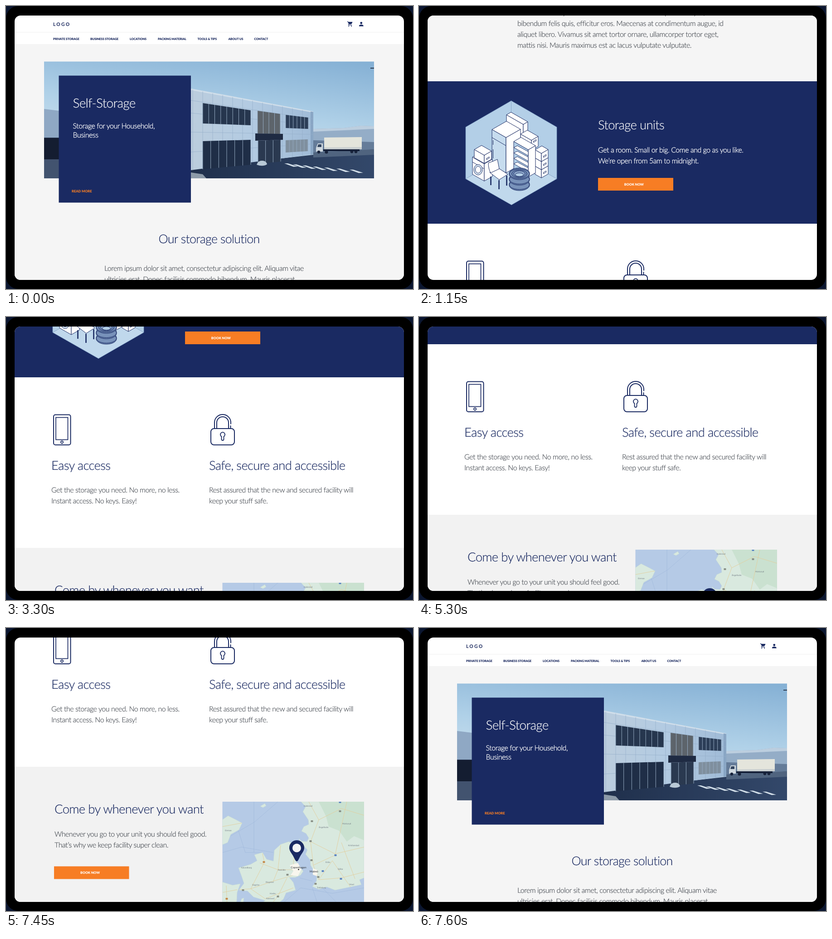
Write an HTML page that moves like this. It is 898 by 624 pixels and loops after 8.6 s.

```html
<!DOCTYPE html>
<html lang="en">
<head>
<meta charset="utf-8">
<title>Storage website walkthrough</title>
<style>
html, body { margin: 0; width: 100%; height: 100%; overflow: hidden; background: #0b1630; }
#tablet { position: absolute; left: 0; top: 0; width: 898px; height: 624px; border-radius: 27px; background: #000; }
#screen { position: absolute; left: 19px; top: 21px; width: 859px; height: 583px; border-radius: 13px; overflow: hidden; background: #fff; }
#page { position: absolute; left: -19px; top: -21px; display: block; }
text { font-family: Lato, "Noto Sans", sans-serif; text-rendering: geometricPrecision; white-space: pre; }
.h, .p { font-weight: 300; fill: currentColor; stroke: currentColor; stroke-width: .2; }
.h { font-size: 27.5px; letter-spacing: -.024em; color: #1a2a62; }
.p { font-size: 15.9px; letter-spacing: -.027em; color: #464b52; }
.light { color: #fff; }
.p.light { stroke-width: .35; }
.nav { font-size: 6.6px; font-weight: 900; letter-spacing: -.01em; fill: #14235a; }
.btn { font-size: 7.3px; font-weight: 900; fill: #fff; text-anchor: middle; }
.foot { font-size: 7.6px; fill: #fff; }
.navy { fill: #1a2a62; }
.orange { fill: #f77d24; }
.line { fill: none; stroke: #1a2a62; stroke-width: 2; stroke-linecap: round; }
.land { fill: #d9e9df; stroke: #c3d8d6; stroke-width: .6; }
.road { fill: none; stroke: #e2cf9d; stroke-width: .9; }
.ferry { fill: none; stroke: #9db5d8; stroke-width: .6; }
.place { font-size: 4.6px; fill: #6e7780; }
.city { font-size: 6.2px; fill: #2c3036; }
</style>
</head>
<body>
<div id="tablet"><div id="screen">
<svg id="page" width="898" height="2000" viewBox="0 0 898 2000">
  <defs>
    <linearGradient id="sky" x1=".9" y1="0" x2=".6" y2="1">
      <stop offset="0" stop-color="#86b1d5"/><stop offset=".5" stop-color="#b0d1e8"/><stop offset="1" stop-color="#d6e6f0"/>
    </linearGradient>
    <linearGradient id="wall"><stop offset="0" stop-color="#bccddd"/><stop offset=".5" stop-color="#b3cbe2"/><stop offset="1" stop-color="#a0bbd7"/></linearGradient>
    <linearGradient id="asphalt" x2="1"><stop offset="0" stop-color="#1f2f4b"/><stop offset="1" stop-color="#33486a"/></linearGradient>
    <clipPath id="photoClip"><path d="M84 122.5H812V380H84z"/></clipPath>
    <clipPath id="mapClip"><path d="M477.5 150H790V383.5H477.5z"/></clipPath>
  </defs>

  <!-- page bands -->
  <path fill="#f5f5f5" d="M0 84H898V778H0z"/>
  <path fill="#f0f0f0" d="M0 57.5H898V58.5H0z"/>
  <path class="navy" d="M0 778H898V1092H0z"/>
  <path fill="#f2f2f2" d="M0 1468H898V1856H0z"/>
  <path class="navy" d="M0 1856H898V2000H0z"/>

  <!-- header -->
  <text x="104" y="44" fill="#14235a" style="font-size:10.4px;font-weight:700;letter-spacing:2.2px">LOGO</text>
  <path class="navy" transform="translate(752.3 32.8) scale(.575)" d="M7 18a2 2 0 1 0 0 4 2 2 0 0 0 0-4zM1 2v2h2l3.6 7.6-1.35 2.44A2 2 0 0 0 7 17h12v-2H7.42a.25.25 0 0 1-.22-.37L8.1 13h7.45c.75 0 1.41-.41 1.75-1.03l3.58-6.49A1 1 0 0 0 20 4H5.2l-.93-2zM17 18a2 2 0 1 0 0 4 2 2 0 0 0 0-4z"/>
  <path class="navy" transform="translate(776.6 32.7) scale(.6)" d="M12 12a4 4 0 1 0 0-8 4 4 0 0 0 0 8zm0 2c-2.67 0-8 1.34-8 4v2h16v-2c0-2.66-5.33-4-8-4z"/>
  <g id="nav" class="nav"></g>

  <!-- hero -->
  <g clip-path="url(#photoClip)">
    <path fill="url(#sky)" d="M84 122H812V381H84z"/>
    <path fill="#8fa8c4" d="M84 227l33 4v64H84z"/>
    <path fill="#42536f" d="M84 290h40v92H84z"/>
    <path fill="#141d31" d="M84 291h33v47H84z"/>
    <path fill="#94adc7" d="M678 271l67-2 38-5 29 1v62H678z"/>
    <path fill="#bccedf" d="M678 271l67-2 38-5 29 1v6l-134 6z"/>
    <path fill="#657c99" d="M678 296l134 4v29H678z"/>
    <path fill="url(#asphalt)" d="M400 360l278-32 134-12v66H400z"/>
    <path fill="#50647f" d="M678 323l134-7v12l-134 6z"/>
    <path fill="url(#wall)" d="M400 181.5L678 233.5V327L400 363z"/>
    <path fill="#d0deea" d="M400 180.5L678 232.5v2.5L400 184z"/>
    <path fill="#88a5c4" d="M672 232.400l6 1.100v93.500l-6 .8z"/>
    <g id="panels" stroke="#94aec9" stroke-width=".7"></g>
    <g id="windows"></g>
    <path fill="#1f2b43" d="M550 281l61 1v13l-61 2z"/>
    <path fill="#b9c9d6" d="M553 350q3-9 12-9t11 8q-9 6-23 1z"/>
    <path fill="#8c9aa8" d="M408 367l26 4 8 9h-34z"/>
    <g id="stripes"></g>
    <path fill="#e4e5dc" d="M702 290l83-1v27l-83 1z"/>
    <path fill="#c9cfd0" d="M702 312l83-1v5l-83 1z"/>
    <path fill="#cfd8df" d="M688 303h11v18h-15v-8z"/>
    <path fill="#33455f" d="M689 305h7v6h-9z"/>
    <g fill="#17223a"><path d="M700 316h80v4h-80z"/><circle cx="690" cy="322" r="3.2"/><circle cx="707" cy="322" r="3.6"/><circle cx="763" cy="321" r="3.4"/><circle cx="772" cy="321" r="3.4"/></g>
    <path fill="#2b3a50" d="M804 136h8v2h-8z"/>
  </g>
  <path class="navy" d="M116.5 153.5H408V433.5H116.5z"/>
  <text class="h light" x="147.5" y="223.5" style="font-size:28px">Self-Storage</text>
  <g id="intro" class="p light"></g>
  <text class="orange" x="145" y="411" style="font-size:7.5px;font-weight:900">READ MORE</text>
  <text class="h" x="448" y="523" text-anchor="middle" style="font-size:26.8px">Our storage solution</text>
  <g id="lorem" class="p"></g>

  <!-- storage units -->
  <g transform="translate(0 612)">
    <path fill="#b3cfe7" d="M203.5 209L304 267V381L204 438.5 103 381V267z"/>
    <path fill="#c0d8ec" d="M103 381L203.5 324 304 381 204 438.5z"/>
    <path fill="none" stroke="#7d9cc2" stroke-width=".8" d="M203.5 209V324L103 381M203.5 324L304 381M203.5 209L304 267V381L204 438.5 103 381V267z"/>
    <g id="goods" stroke="#1a2a62" stroke-width="1" stroke-linejoin="round"></g>
    <g fill="#fff" stroke="#1a2a62" stroke-width="1" stroke-linejoin="round">
      <path fill="none" d="M118 344l26 15M161 290l31 18M163.5 296v10M163.5 316v20"/>
      <ellipse cx="130.5" cy="361" rx="9.5" ry="11.5" fill="#d5e4f1"/>
      <ellipse cx="130.5" cy="361" rx="6" ry="7.5"/>
      <path d="M158.5 376v19M176.5 384v20M193.5 374v22" stroke-width="2.6"/>
      <path d="M156 367l20-9 20 13-19 12z"/>
      <path d="M153 346q10-3 20-8l4 21-19 9q-5-9-5-22z"/>
    </g>
    <g id="tyres" stroke="#1a2a62"></g>
    <path class="orange" d="M395 379H561V407H395z"/>
    <text class="btn" x="474.3" y="395.7">BOOK NOW</text>
  </g>
  <text class="h light" x="395" y="884">Storage units</text>
  <g id="units" class="p light"></g>

  <!-- benefits -->
  <g class="line" transform="translate(0 959)">
    <rect x="105" y="215.5" width="37.5" height="66.5" rx="4"/>
    <rect x="110" y="221.5" width="26.5" height="49" stroke-width="1.7"/>
    <circle cx="123.5" cy="276" r="2.6" stroke-width="1.6"/>
    <rect x="452" y="246" width="52" height="36" rx="7"/>
    <path d="M460 245V232.5a18 17.5 0 0 1 36 0v3M495.5 240v5M465 245V232.5a13 12.5 0 0 1 26 0V245"/>
    <path stroke-width="1.8" d="M475.5 263.5a5 5 0 1 1 5 0v6a2.5 2.5 0 0 1-5 0z"/>
  </g>
  <text class="h" x="100" y="1295.5">Easy access</text>
  <text class="h" x="448" y="1295.5">Safe, secure and accessible</text>
  <g id="easy" class="p"></g>
  <g id="safe" class="p"></g>

  <!-- visit -->
  <text class="h" x="107" y="1571">Come by whenever you want</text>
  <g id="visit" class="p"></g>
  <path class="orange" d="M106 1687.5H271.5V1715.5H106z"/>
  <text class="btn" x="185.5" y="1704">BOOK NOW</text>
  <g transform="translate(0 1395)" clip-path="url(#mapClip)">
    <path fill="#b5cae6" d="M477 150H790V384H477z"/>
    <path class="ferry" d="M547 150V262M478 236L548 195 600 150M510 205L528 262 566 262M478 262L520 250 590 262M600 383L650 340 720 352 790 340M690 383L676 340M648 318L676 325M740 383L700 342"/>
    <path class="land" d="M651 150H790V318L780 322 784 333 760 338 726 345 708 338 690 343 676 337 685 325 686 312 678 300 672 290 671 278 661 266 665 256 650 240 646 231 652 237 664 238 668 230 662 220 652 215 657 205 668 200 667 190 655 172 661 161z"/>
    <path fill="#c6dfcb" opacity=".75" d="M690 150H790V235L768 226 752 238 735 214 712 205 706 182z"/>
    <path class="land" d="M513 296L540 288 554 280 548 267 566 262 575 277 590 281 592 257 606 244 624 238 641 245 650 262 641 284 647 294 656 303 650 312 638 317 625 317 634 328 639 345 618 351 612 365 598 376 588 384 568 384 558 378 572 368 546 360 533 347 514 345 525 330 520 315z"/>
    <path class="land" d="M477 327L500 334 517 331 510 350 509 370 500 384H477zM477 190L490 181 506 189 521 197 514 212 496 222 489 240 477 245zM561 160l10-6 3 5-7 4zM512 384l8-20 5-2-3 22z"/>
    <path class="road" d="M668 150L690 190 672 238 678 290 690 322 740 318 790 305M690 190L740 165 790 180M672 238L726 265 790 250M678 290L726 268 752 150M690 322L720 280 760 338M740 240L770 320M641 246L634 285 640 310M640 300L600 300 560 285M634 312L590 325 540 342 515 344M620 318L600 358 580 383M590 325L600 300 606 246M540 342L570 284 566 264M540 342L572 364 634 340M478 350L510 344M488 384L486 335M477 205L520 197"/>
    <path fill="#f8f6ee" d="M626 290l18-5 8 14-8 15-16-2 6-9zM677 297l11 4-2 13-9-3z"/>
    <g id="shields"></g>
    <g id="places" class="place"></g>
    <text class="city" x="628.5" y="296.5">Copenhagen</text>
    <text class="city" x="670" y="306">Malmö</text>
    <circle cx="645.5" cy="299.5" r="1.3"/>
    <path class="navy" d="M641.5 281.5q-2 0-4-4-4-9-9.5-16.5a16.5 16.5 0 1 1 27 0q-5.5 7.5-9.5 16.500-2 4-4 4z"/>
    <circle cx="641.5" cy="252" r="9.5" fill="#f4f4f4"/>
  </g>

  <!-- footer -->
  <g id="about" class="foot"></g>
  <g id="contact" class="foot"></g>
  <g id="links" class="foot"></g>
  <g id="social" class="foot"></g>
</svg>
</div></div>
<script>
const $ = id => document.getElementById(id);
const add = (id, markup) => $(id).insertAdjacentHTML('beforeend', markup);
const label = (x, y, s) => `<text x="${x}" y="${y}">${s}</text>`;
const lines = (id, x, y, step, rows) => rows.forEach((s, i) => add(id, label(x, y + i * step, s)));
const poly = (points, fill) => `<polygon points="${points.join(' ')}" fill="${fill}"/>`;
const range = n => [...Array(n).keys()];

// Text blocks
[[104, 'PRIVATE STORAGE'], [186, 'BUSINESS STORAGE'], [273, 'LOCATIONS'], [335, 'PACKING MATERIAL'],
 [422.5, 'TOOLS &amp; TIPS'], [490.5, 'ABOUT US'], [547.5, 'CONTACT']]
  .forEach(([x, s]) => add('nav', label(x, 74.7, s)));
lines('intro', 147.5, 270, 20, ['Storage for your Household,', 'Business']);
lines('lorem', 217, 583.5, 24, [
  'Lorem ipsum dolor sit amet, consectetur adipiscing elit. Aliquam vitae',
  'ultricies erat. Donec facilisis commodo bibendum. Mauris placerat',
  'sed lorem vitae pretium. Nullam a orci sit amet nisl porta semper,',
  'bibendum felis quis, efficitur eros. Maecenas at condimentum augue, id',
  'aliquet libero. Vivamus sit amet tortor ornare, ullamcorper tortor eget,',
  'mattis nisi. Mauris maximus est ac lacus vulputate vulputate.']);
lines('units', 395, 934.5, 24, ['Get a room. Small or big. Come and go as you like.', 'We’re open from 5am to midnight.']);
lines('easy', 100, 1346, 24, ['Get the storage you need. No more, no less.', 'Instant access. No keys. Easy!']);
lines('safe', 448, 1346, 24, ['Rest assured that the new and secured facility will', 'keep your stuff safe.']);
lines('visit', 107, 1621.5, 24, ['Whenever you go to your unit you should feel good.', 'That’s why we keep facility super clean.']);
lines('about', 102, 1894, 14, ['Lorvik Depot A/S']);
lines('contact', 102, 1922, 14, ['CVR-no.: 4444444', 'Email: write@box.test', 'Phone: +45 0000 0000']);
lines('links', 349, 1894, 14, ['About us', 'Contact', 'Terms &amp; Conditions', 'Insurance', 'Data privacy', 'Cookies', 'Legal Notice']);
lines('social', 601.5, 1894, 20.7, ['Quipsel', 'Plimvora', 'Jobvanta']);
range(3).forEach(i => add('social', `<circle cx="588.5" cy="${1891.5 + i * 20.7}" r="6.7" fill="#8d9abb"/>`));

// Building: slanted glazing split into n panes
function glazing(x1, top1, bottom1, x2, top2, bottom2, n, fill) {
  const mix = (a, b, k) => a + (b - a) * k;
  const bars = range(n + 1).map(i => {
    const k = i / n, x = mix(x1, x2, k);
    return `M${x} ${mix(top1, top2, k)}V${mix(bottom1, bottom2, k)}`;
  }).join('');
  add('windows', poly([x1, top1, x2, top2, x2, bottom2, x1, bottom1], fill) +
    `<path d="${bars}" stroke="#93a9c0" stroke-width="1"/>`);
}
glazing(434, 214, 259, 540, 230, 263, 8, '#26364e');
glazing(434, 298, 360, 540, 295, 350, 6, '#1f2e47');
glazing(555, 231, 281, 605, 238, 283, 4, '#5d646b');
glazing(556, 297, 348, 606, 295, 343, 3, '#2a3950');
glazing(617, 240, 269, 667, 246, 271, 6, '#2c3e58');
glazing(617, 296, 323, 666, 294, 320, 6, '#7f8f9e');
range(13).forEach(i => {
  const x = 412 + i * 22;
  add('panels', `<path d="M${x} ${183.5 + (x - 408) * .187}V${362 - (x - 408) * .13}"/>`);
});
[[208, 249], [236, 262], [278, 283], [322, 304]].forEach(([a, b]) => add('panels', `<path d="M408 ${a}L678 ${b}"/>`));
range(7).forEach(i => {
  const x = 614 + i * (18 + i), y = 347 + i * 2.3;
  add('stripes', poly([x, y, x + 8, y, x + 30, y + 7, x + 20, y + 7.5], '#d3dfe9'));
});

// Isometric box from its lower front corner
const SLOPE = .57;
function box(x, y, left, right, height, side = '#fff') {
  const top = y - height, l = left * SLOPE, r = right * SLOPE;
  add('goods',
    poly([x, y, x - left, y - l, x - left, top - l, x, top], side) +
    poly([x, y, x + right, y - r, x + right, top - r, x, top], '#fff') +
    poly([x, top, x - left, top - l, x - left + right, top - l - r, x + right, top - r], '#fff'));
}
function tag(x, y) { add('goods', poly([x, y, x + 6, y - 3.4, x + 6, y - .6, x, y + 2.8], '#fff')); }
box(230, 300, 37, 10, 39);
box(248, 318, 24, 15, 22);
tag(252.5, 298);
box(192, 368, 31, 32, 78, '#c6dcee');
[379, 361, 343].forEach(y => { box(270, y, 14, 15, 18); tag(274.5, y - 12); });
box(241, 377, 32, 16, 60, '#b3cfe7');
range(4).forEach(i => {
  const y = 312 + i * 12;
  add('goods', poly([209, y, 217, y - 4, 241, y + 9, 241, y + 18], '#fff'));
});
box(144, 386, 26, 18, 38);
box(144, 347, 22, 16, 18);
tag(149, 336);

const oval = (cy, rx, ry, fill) => `<ellipse cx="221.5" cy="${cy}" rx="${rx}" ry="${ry}" fill="${fill}"/>`;
[395, 383, 371].forEach(y => add('tyres',
  `<path fill="#6d88b3" d="M199 ${y}v-2a22.5 12 0 0 1 45 0v2a22.5 12 0 0 1-45 0z"/>` + oval(y - 1, 22, 10.5, '#7892ba')));
add('tyres', oval(370, 17, 8.5, '#6d88b3') + oval(370, 12.5, 6.5, '#8fa9cc') + oval(372, 9, 4, '#b3cfe7'));

// Map details
[[657, 161, 'Halmstad'], [690, 208, 'Ängelholm'], [742, 200, 'Markaryd'], [755, 248, 'Kristianstad'], [705, 285, 'Eslöv'],
 [732, 300, 'Sjöbo'], [686, 341, 'Trelleborg'], [757, 334, 'Ystad'], [600, 302, 'Roskilde'], [519, 297, 'Kalundborg'],
 [573, 329, 'Ringsted'], [543, 335, 'Slagelse'], [582, 354, 'Haslev'], [574, 365, 'Næstved'], [483, 379, 'Svendborg'], [483, 215, 'Grenaa']]
  .forEach(([x, y, s]) => add('places', label(x, y, s)));
[[737, 151, 1], [737, 171], [675, 193], [672, 237], [727, 268, 1], [674, 279], [699, 303, 1], [689, 316], [739, 320, 1], [683, 331],
 [621, 311], [569, 283, 2], [523, 345], [600, 359], [487, 364, 2]].forEach(([x, y, kind = 0]) =>
  add('shields', `<rect x="${x - 2.5}" y="${y - 2}" width="5" height="4" rx=".8" fill="${['#8b9188', '#5d86c4', '#c48a4a'][kind]}"/>`));

// Scroll: each move takes six equal jumps, 30 ms apart
const LOOP = 8600, JUMPS = 6, GAP = 30;
const moves = [[1000, 0, 612], [3150, 612, 959], [5300, 959, 1395], [7450, 1395, 0]];
const stop = (time, y) => ({ offset: time / LOOP, transform: `translateY(${-y}px)`, easing: 'step-end' });
const stops = moves.flatMap(([start, from, to]) => range(JUMPS).map(i =>
  stop(start + i * GAP - .5, Math.ceil(from + (to - from) * (i + 1) / JUMPS - .5))));
$('page').animate([stop(0, 0), ...stops, stop(LOOP, 0)], { duration: LOOP, iterations: Infinity });
</script>
</body>
</html>
```
